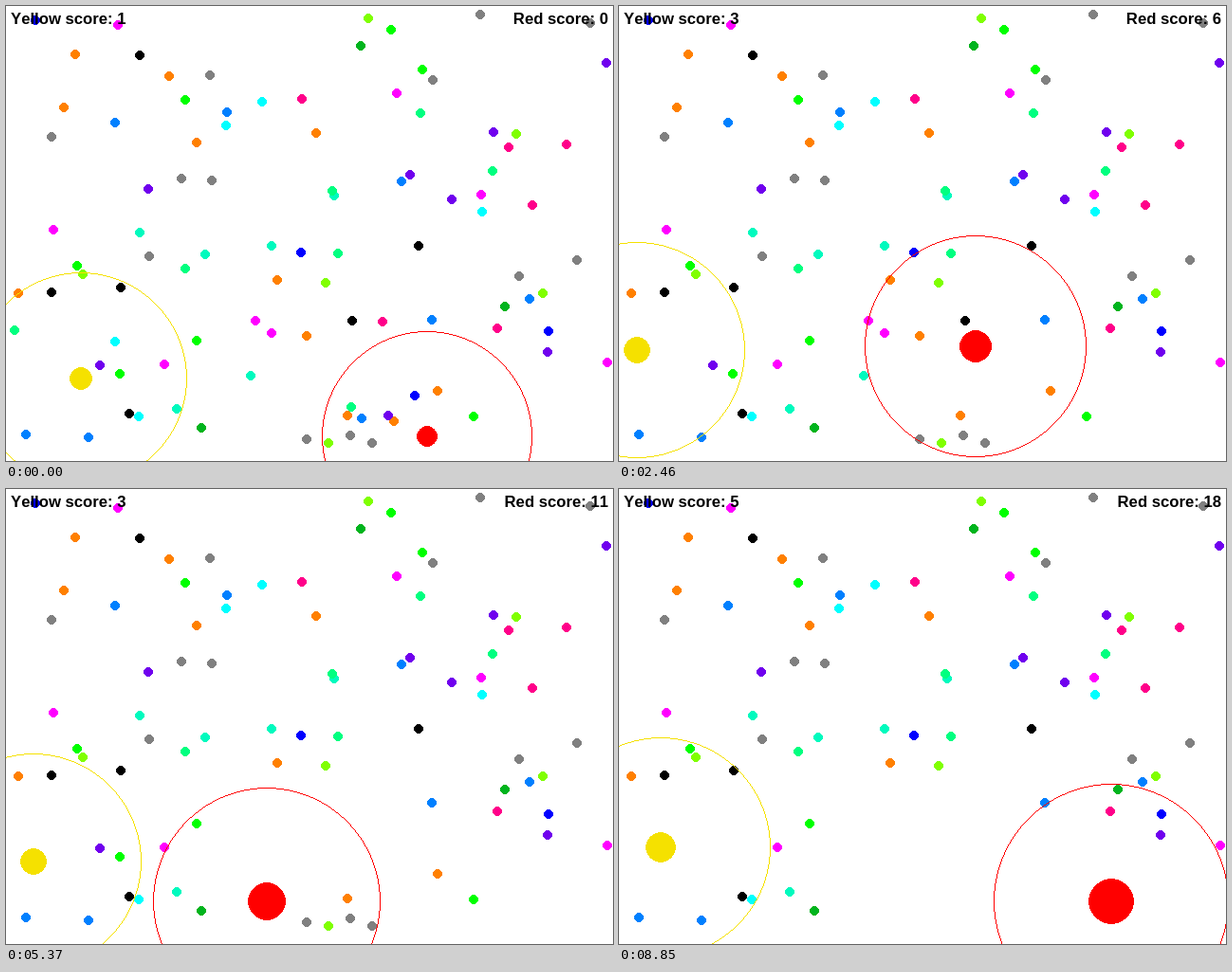
An HTML page with a canvas that plays this animation: 640 by 480 pixels, repeating every 8880 ms.

```html
<!DOCTYPE html>
<html lang="en">
<head>
<meta charset="utf-8">
<title>Dot eaters</title>
<style>
  html, body { margin: 0; width: 100%; height: 100%; overflow: hidden; background: #fff; }
  canvas { display: block; }
</style>
</head>
<body>
<canvas id="stage" width="640" height="480"></canvas>
<script>
const ctx = document.getElementById('stage').getContext('2d');
const TICK = 30, LOOP = 8880;

const GREY = '#808080', ORANGE = '#ff8000', BLACK = '#000', MAGENTA = '#f0f', LIME = '#80ff00',
  GREEN = '#0f0', FOREST = '#00b41e', AZURE = '#0080ff', BLUE = '#00f', PURPLE = '#7000ee',
  CYAN = '#0ff', PINK = '#ff008a', SPRING = '#00ff80', TEAL = '#00fabe';

const dots = [];
function addDot(color, x, y, eaten = Infinity) {
  dots.push({ color, x, y, eaten });
}
function scatter(color, ...xy) {
  for (let i = 0; i < xy.length; i += 2) addDot(color, xy[i], xy[i + 1]);
}

// Dots that nobody reaches
scatter(GREY, 500, 9, 616, 18, 215, 73, 450, 78, 48, 138, 185, 182, 217, 184, 151, 264, 602, 268, 541, 285);
scatter(ORANGE, 73, 51, 172, 74, 61, 107, 201, 144, 327, 134, 286, 289, 13, 303);
scatter(BLACK, 141, 52, 435, 253, 48, 302, 121, 297, 130, 430);
scatter(MAGENTA, 118, 20, 412, 92, 501, 199, 50, 236, 634, 376, 167, 378);
scatter(LIME, 382, 13, 538, 135, 337, 292, 566, 303, 81, 283);
scatter(GREEN, 406, 25, 439, 67, 189, 99, 75, 274, 201, 353);
scatter(FOREST, 374, 42, 526, 317, 206, 445);
scatter(AZURE, 115, 123, 233, 112, 417, 185, 552, 309, 449, 331, 21, 452, 87, 455);
scatter(BLUE, 31, 15, 311, 260, 572, 343);
scatter(PURPLE, 633, 60, 514, 133, 426, 178, 470, 204, 150, 193, 571, 365);
scatter(CYAN, 270, 101, 232, 126, 502, 217, 140, 433);
scatter(PINK, 312, 98, 530, 149, 591, 146, 555, 210, 518, 340);
scatter(TEAL, 141, 239, 210, 262, 280, 253, 180, 425, 346, 200);
scatter(SPRING, 437, 113, 344, 195, 513, 174, 350, 261, 189, 277);

const radius = score => Math.floor(Math.sqrt(137 + 27 * score));

let seed = 4242;
const random = () => (seed = seed * 16807 % 2147483647) / 2147483647;

// One jittery step along an axis, always leaving enough ticks to arrive
function stride(from, to, step, left) {
  const need = Math.round((to - from) / step);
  const wish = Math.max(-1, Math.min(1, Math.round(need / left + (random() - 0.5) * 2)));
  return from + step * Math.max(need - left + 1, Math.min(need + left - 1, wish));
}

function travel(eater, x, y, tick) {
  const { path, pace } = eater;
  while (path.length <= tick) {
    const last = path.at(-1), left = tick - path.length + 1;
    const step = pace(radius(last.score));
    path.push({
      x: stride(last.x, x, step, left),
      y: stride(last.y, y, step, left),
      score: last.score
    });
  }
  return path[tick];
}

// Walk to (x, y), catching each prey at even intervals on the way
function hunt(eater, tick, x, y, ...prey) {
  const start = eater.path.length - 1;
  prey.forEach(([color, px, py], i) => {
    const now = eater.path.at(-1);
    const dx = px - now.x, dy = py - now.y;
    const approach = Math.max(0, 1 - radius(now.score) / Math.hypot(dx, dy));
    const caught = Math.round(start + (tick - start) * (i + 1) / (prey.length + 1));
    travel(eater, now.x + dx * approach, now.y + dy * approach, caught).score++;
    addDot(color, px, py, caught);
  });
  Object.assign(travel(eater, x, y, tick), { x, y });
}

const yellow = { color: '#f5e100', pace: () => 5, path: [{ x: 79, y: 393, score: 1 }] };
hunt(yellow, 51, 14, 353, [CYAN, 115, 354], [SPRING, 9, 342]);
hunt(yellow, 114, 24, 358);
hunt(yellow, 150, 54, 348);
hunt(yellow, 179, 29, 393);
hunt(yellow, 229, 94, 398, [PURPLE, 99, 379]);
hunt(yellow, 295, 44, 378, [GREEN, 120, 388]);

// Red slows down as it grows
const red = { color: '#f00', pace: r => Math.floor(10 - (r - 11) / 6), path: [{ x: 444, y: 454, score: 0 }] };
hunt(red, 51, 394, 404, [BLUE, 431, 411], [ORANGE, 409, 438], [PURPLE, 403, 432],
  [AZURE, 375, 435], [SPRING, 364, 423]);
hunt(red, 114, 355, 363, [PINK, 397, 333], [BLACK, 365, 332]);
hunt(red, 150, 267, 331, [ORANGE, 317, 348], [MAGENTA, 280, 345], [MAGENTA, 263, 332]);
hunt(red, 179, 275, 435, [TEAL, 258, 390]);
hunt(red, 229, 355, 451, [GREY, 317, 457], [LIME, 340, 461], [GREY, 363, 453], [ORANGE, 360, 432]);
hunt(red, 295, 519, 435, [GREY, 386, 461], [ORANGE, 455, 406], [GREEN, 493, 433]);

// Hard-edged circles: call plot for every column k and height h of one octant
function octant(r, plot) {
  for (let k = 1, h = r; k <= h; k++) {
    h = Math.round(Math.sqrt(r * r - k * k));
    plot(k, h);
    plot(h, k);
  }
}

function disc(x, y, r, color) {
  ctx.fillStyle = color;
  octant(r, (a, b) => ctx.fillRect(x - a, y - b, 2 * a, 2 * b));
}

function ring(x, y, r, color) {
  ctx.fillStyle = color;
  octant(r, (a, b) => {
    for (const px of [x - a, x + a - 1]) {
      for (const py of [y - b, y + b - 1]) ctx.fillRect(px, py, 1, 1);
    }
  });
}

function drawEater({ path, color }, tick) {
  const { x, y, score } = path[tick];
  const r = radius(score);
  disc(x, y, r, color);
  ring(x, y, r + 100, color);
}

function label(text, x, align) {
  ctx.fillStyle = '#000';
  ctx.font = 'bold 16.7px "Liberation Sans", Arial, sans-serif';
  ctx.fontKerning = 'none';
  ctx.textAlign = align;
  ctx.fillText(text, x, 19);
}

function draw(now) {
  const tick = Math.floor(now % LOOP / TICK);
  ctx.fillStyle = '#fff';
  ctx.fillRect(0, 0, 640, 480);
  for (const { x, y, color, eaten } of dots) {
    if (tick < eaten) disc(x, y, 5, color);
  }
  drawEater(yellow, tick);
  drawEater(red, tick);
  label('Yellow score: ' + yellow.path[tick].score, 5, 'left');
  label('Red score: ' + red.path[tick].score, 635, 'right');
}

const begin = performance.now();
function loop() {
  draw(performance.now() - begin);
  requestAnimationFrame(loop);
}
loop();
</script>
</body>
</html>
```
